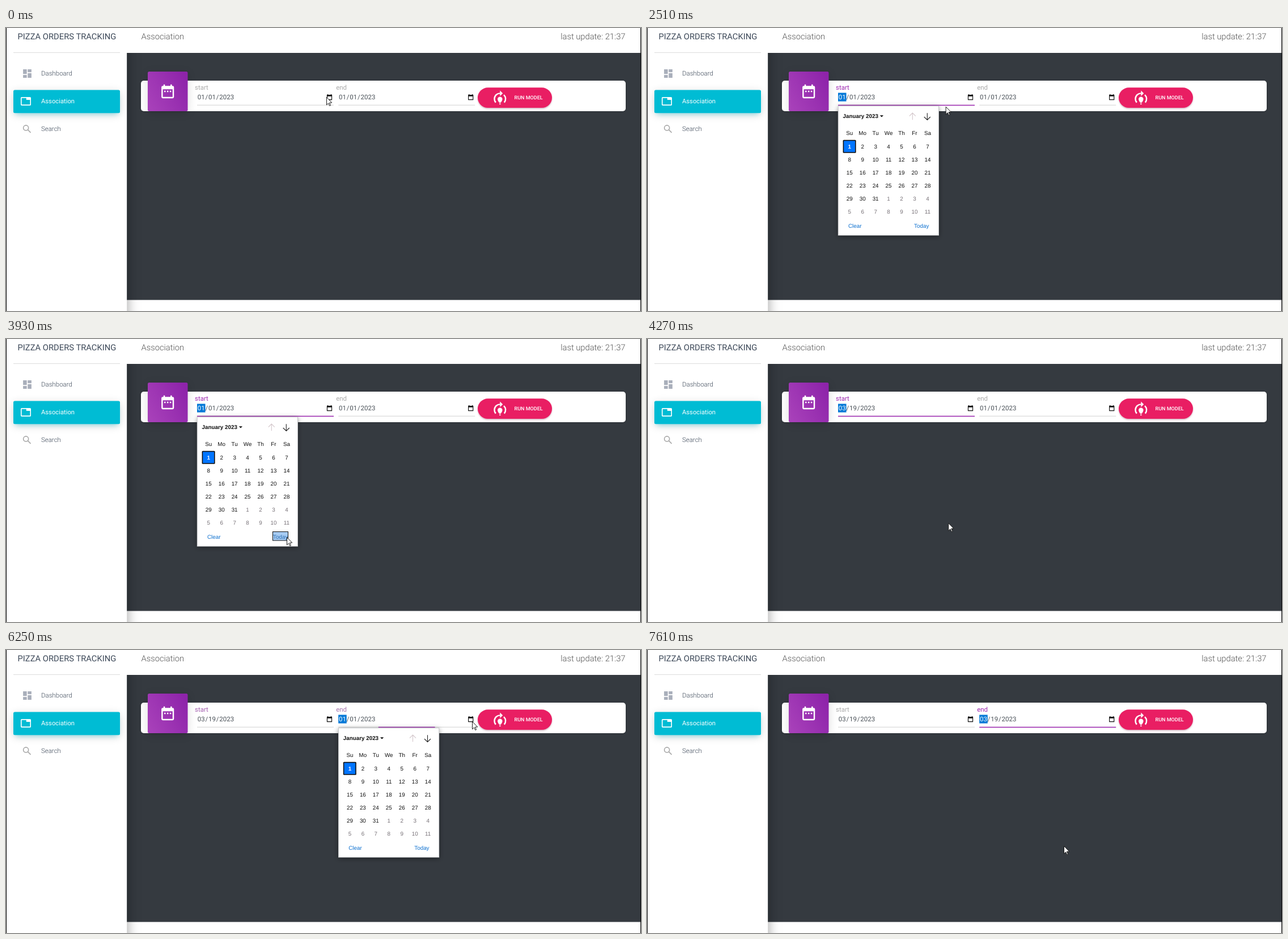
Animation of 1120 by 500 pixels, one loop 8000 ms. Source, as an HTML page with a canvas:

```html
<!DOCTYPE html>
<html lang="en">
<head>
<meta charset="utf-8">
<title>Pizza orders tracking</title>
<style>
  html, body { margin: 0; width: 100%; height: 100%; overflow: hidden; background: #fff; }
  canvas { display: block; }
</style>
</head>
<body>
<canvas id="stage" width="1120" height="500"></canvas>
<script>
const LOOP = 8000;
const SCALE = 0.82;
const STEP = 28 * SCALE;
const PURPLE = [156, 39, 176];
const GREY = [170, 170, 170];
const INK = '#101010';
const LINK = '#0b6fcf';
const SANS = '"Roboto", sans-serif';
const ARIAL = '"Liberation Sans", Arial, sans-serif';

const FIELDS = [
  { dx: 0, label: 'start', focus: 2030, blur: 6170, pick: 4130 },
  { dx: 249.2, label: 'end', focus: 6170, blur: LOOP, pick: 7460 }
];

// Pointer moves: from, until, x, y; bend delays the vertical part.
const HOME = [565, 122];
const MOVES = [
  { from: 180, until: 340, x: 569, y: 127 },
  { from: 2240, until: 2790, x: 483, y: 266, bend: 3.5 },
  { from: 2850, until: 3000, x: 501, y: 339 },
  { from: 3220, until: 3480, x: 495, y: 345 },
  { from: 3920, until: 3930, x: 495, y: 350 },
  { from: 4180, until: 4930, x: 794, y: 143 },
  { from: 4990, until: 5050, x: 808, y: 131 },
  { from: 5180, until: 5650, x: 822, y: 126, bend: 2 },
  { from: 6360, until: 6860, x: 735, y: 346 }
];

const stage = document.getElementById('stage');
const backdrop = document.createElement('canvas');
backdrop.width = stage.width;
backdrop.height = stage.height;
let ctx = backdrop.getContext('2d');

const clamp01 = v => Math.max(0, Math.min(1, v));
const easeOut = p => 1 - (1 - clamp01(p)) ** 1.7;
const lerp = (a, b, p) => a + (b - a) * p;
const mix = (a, b, p) => `rgb(${a.map((v, i) => Math.round(lerp(v, b[i], p)))})`;

function rect(x, y, w, h, fill, r = 0) {
  ctx.fillStyle = fill;
  ctx.beginPath();
  ctx.roundRect(x, y, w, h, r);
  ctx.fill();
}

function text(str, x, y, size, fill, { weight = 400, family = SANS, align = 'left' } = {}) {
  ctx.textRendering = 'geometricPrecision';
  ctx.font = `${weight} ${size * SCALE}px ${family}`;
  ctx.textAlign = align;
  ctx.fillStyle = fill;
  ctx.fillText(str, x, y);
  return ctx.measureText(str).width;
}

function polygon(points) {
  ctx.beginPath();
  for (const [x, y] of points) ctx.lineTo(x, y);
  ctx.closePath();
}

// CSS-like box shadow, painted without the box itself
function shadow(x, y, w, h, { dy = 0, blur, spread = 0, color, r = 3 }) {
  const far = 4000;
  ctx.save();
  ctx.shadowColor = color;
  ctx.shadowBlur = blur * SCALE;
  ctx.shadowOffsetX = far;
  ctx.shadowOffsetY = dy * SCALE;
  const s = spread * SCALE;
  rect(x - far - s, y - s, w + 2 * s, h + 2 * s, '#000', r);
  ctx.restore();
}

// Icons are drawn on a 24 unit grid.
function icon(cx, cy, size, color, paint) {
  ctx.save();
  ctx.translate(cx - size * SCALE / 2, cy - size * SCALE / 2);
  ctx.scale(size * SCALE / 24, size * SCALE / 24);
  ctx.fillStyle = ctx.strokeStyle = color;
  ctx.lineWidth = 2;
  ctx.beginPath();
  paint();
  ctx.restore();
}

function dashboardIcon() {
  for (const [x, split] of [[3, 13], [13, 9]]) {
    ctx.rect(x, 3, 8, split - 3);
    ctx.rect(x, split + 2, 8, 19 - split);
  }
  ctx.fill();
}

function tabIcon() {
  ctx.roundRect(1, 3, 22, 18, 2);
  ctx.rect(3, 5, 10, 14);
  ctx.rect(13, 9, 8, 10);
  ctx.fill('evenodd');
}

function searchIcon() {
  ctx.arc(9.5, 9.5, 5.5, 0, 2 * Math.PI);
  ctx.moveTo(13.7, 13.7);
  ctx.lineTo(19.7, 19.7);
  ctx.stroke();
}

function dateRangeIcon() {
  ctx.roundRect(3, 4, 18, 18, 2);
  ctx.rect(5, 9, 14, 11);
  for (const x of [7, 11, 15]) ctx.rect(x, 11, 2, 2);
  for (const x of [6, 16]) ctx.rect(x, 2, 2, 2);
  ctx.fill('evenodd');
}

function trainingIcon() {
  ctx.arc(12, 13, 8, Math.PI * 0.775, Math.PI * 1.5);
  ctx.stroke();
  ctx.beginPath();
  ctx.arc(12, 13, 8, -Math.PI * 0.26, Math.PI * 0.225);
  ctx.stroke();
  polygon([[12, 1], [16, 5], [12, 9]]);
  ctx.fill();
  ctx.beginPath();
  ctx.arc(12, 13.5, 3.5, Math.PI, 0);
  ctx.quadraticCurveTo(15.3, 15.5, 13, 18.5);
  ctx.lineTo(11, 18.5);
  ctx.quadraticCurveTo(8.7, 15.5, 8.5, 13.5);
  ctx.rect(11, 19.5, 2, 1.5);
  ctx.fill();
}

function pickerIcon() {
  ctx.rect(3, 4, 18, 18);
  ctx.rect(5.3, 9, 13.4, 10.5);
  for (const x of [5, 16.5]) ctx.rect(x, 2, 2.5, 2);
  ctx.fill('evenodd');
}

function drawSidebar() {
  ctx.save();
  ctx.beginPath();
  ctx.rect(213.2, 44, 905, 456);
  ctx.clip();
  shadow(0, -60, 213, 700, { dy: 16, blur: 38, spread: -12, color: 'rgba(0,0,0,.56)' });
  shadow(0, -60, 213, 700, { dy: 4, blur: 25, color: 'rgba(0,0,0,.12)' });
  ctx.restore();

  text('PIZZA ORDERS TRACKING', 20.5, 20.3, 18, '#3c4858');
  rect(13, 43, 188, 1, '#dcdcdc');

  const tab = [13, 109.4, 188, 40.8];
  shadow(...tab, { dy: 4, blur: 20, color: 'rgba(0,0,0,.14)' });
  shadow(...tab, { dy: 7, blur: 10, spread: -5, color: 'rgba(0,188,212,.4)' });
  rect(...tab, '#00bcd4', 2.5);

  icon(37.5, 80.5, 24, '#a9afbb', dashboardIcon);
  icon(35, 129.5, 24, '#fff', tabIcon);
  icon(37.2, 178.5, 24, '#a9a9a9', searchIcon);
  ['Dashboard', 'Association', 'Search'].forEach((name, i) => {
    const active = i === 1;
    text(name, 62, 84 + 49 * i, active ? 13.7 : 14, active ? '#fff' : '#3c4858', { weight: active ? 400 : 300 });
  });
}

function drawCard() {
  shadow(238, 93, 855, 54, { dy: 1, blur: 4, color: 'rgba(0,0,0,.14)', r: 5 });
  rect(238, 93, 855, 54, '#fff', 5);

  shadow(250, 77, 70.5, 70, { dy: 4, blur: 20, color: 'rgba(0,0,0,.14)' });
  const violet = ctx.createLinearGradient(250, 130, 320, 94);
  violet.addColorStop(0, '#a740b9');
  violet.addColorStop(1, '#8e24aa');
  rect(250, 77, 70.5, 70, violet, 2.5);
  icon(285.2, 112, 36, '#fff', dateRangeIcon);

  const button = [832, 105.3, 131, 35.8];
  shadow(...button, { dy: 2, blur: 3, color: 'rgba(120,20,60,.3)', r: 18 });
  rect(...button, '#e91e63', 18);
  icon(871.3, 124, 36, '#fff', trainingIcon);
  text('RUN MODEL', 896.5, 126, 11, '#fff', { weight: 500 });
}

function drawBackdrop() {
  rect(0, 0, 1120, 500, '#fff');
  rect(213.2, 44, 905.8, 436.5, '#353a40');
  drawSidebar();
  drawCard();
  text('Association', 238.5, 20.3, 18, '#555', { weight: 300 });
  text('last update: 21:37', 1092.5, 20.3, 18, '#555', { weight: 300, align: 'right' });
  rect(0, 0, 1, 500, '#000');
  rect(1119, 0, 1, 500, '#000');
}

function drawDate(x, date, selected) {
  const pad = SCALE;
  date.split('/').forEach((part, i) => {
    if (i) x += text('/', x, 126, 14, '#495057');
    const active = selected && i === 0;
    const width = 14 * SCALE * 0.5616 * part.length;
    if (active) rect(x, 114.5, width + 2 * pad, 15.1, '#0078d7');
    text(part, x + pad, 126, 14, active ? '#fff' : '#495057');
    x += width + 2 * pad;
  });
}

function drawField(f, t) {
  const x = 337 + f.dx, width = 241;
  const focused = t >= f.focus && t < f.blur;
  const grown = focused ? easeOut((t - f.focus) / 300) : 0;
  const tint = t < f.blur ? grown : 1 - easeOut((t - f.blur) / 300);

  text(f.label, 333 + f.dx, 109, 14, mix(GREY, PURPLE, tint));
  rect(x, 135.7, width, 1, '#d2d2d2');
  rect(x + width / 2 * (1 - grown), 135.7, width * grown, 1.6, '#9c27b0');
  drawDate(x, t >= f.pick ? '03/19/2023' : '01/01/2023', focused);
  icon(570.5 + f.dx, 122.2, 15, '#111', pickerIcon);
}

function drawArrow(x, y, dir, color) {
  ctx.strokeStyle = color;
  ctx.lineWidth = 1.1;
  ctx.beginPath();
  ctx.moveTo(x, y - 6 * dir);
  ctx.lineTo(x, y + 6 * dir);
  ctx.moveTo(x - 5.5, y + 0.7 * dir);
  ctx.lineTo(x, y + 6.2 * dir);
  ctx.lineTo(x + 5.5, y + 0.7 * dir);
  ctx.stroke();
}

function drawMonth(x) {
  const bold = { family: ARIAL, weight: 700 };
  const centered = { family: ARIAL, align: 'center' };
  const column = i => x + 20.4 + (i % 7) * STEP;

  text('January 2023', x + 8.8, 159.2, 12, INK, bold);
  polygon([[x + 74, 154.3], [x + 80.2, 154.3], [x + 77.1, 157.5]]);
  ctx.fill();
  drawArrow(x + 131.5, 156.3, -1, '#d3c6ca');
  drawArrow(x + 157.5, 156.3, 1, '#222');

  'Su Mo Tu We Th Fr Sa'.split(' ').forEach((day, i) =>
    text(day, column(i), 189.2, 12, INK, centered));

  rect(x + 8.8, 197.8, 23, 23, INK, 1.5);
  rect(x + 10.4, 199.4, 19.8, 19.8, '#0075ff');
  for (let i = 0; i < 42; i++) {
    const color = i === 0 ? '#fff' : i < 31 ? INK : '#767076';
    const y = 212.9 + Math.floor(i / 7) * STEP;
    text(i % 31 + 1, column(i), y, 12, color, i ? centered : { ...centered, ...bold });
  }
}

function drawPopup(f, t, [px, py]) {
  const fade = 70;
  if (t < f.focus || t >= f.pick + fade) return;
  const x = 336.8 + f.dx, y = 137.5, w = 178.2, h = 229.2;

  ctx.save();
  ctx.beginPath();
  ctx.rect(0, 0, 1120, 500);
  ctx.rect(x, y, w, h);
  ctx.clip('evenodd');
  shadow(x, y, w, h, { dy: 2, blur: 11, color: 'rgba(0,0,0,.42)' });
  ctx.restore();

  if (t < f.focus + fade) {
    const shade = ctx.createLinearGradient(0, y, 0, 147);
    shade.addColorStop(0, 'rgba(0,0,0,.16)');
    shade.addColorStop(1, 'rgba(0,0,0,.03)');
    rect(x, y, w, 9.5, shade);
    return;
  }
  rect(x, y, w, h, '#b4b6b9');
  rect(x + 0.8, y + 0.8, w - 1.6, h - 1.6, '#fff');
  drawMonth(x);

  const hover = px > x + 133 && px < x + 161 && py >= 340 && py < 357;
  if (hover) {
    rect(x + 133.2, 340, 28, 16.5, INK);
    rect(x + 134.2, 341, 26, 14.5, '#a6cbf3');
  }
  text('Clear', x + 18.2, 352.8, 12, LINK, { family: ARIAL });
  text('Today', x + 134.3, 352.8, 12, hover ? '#2a6cae' : LINK, { family: ARIAL });
}

function pointerAt(t) {
  let [x, y] = HOME;
  for (const m of MOVES) {
    const p = clamp01((t - m.from) / (m.until - m.from));
    x = lerp(x, m.x, p);
    y = lerp(y, m.y, p ** (m.bend || 1));
  }
  return [x, y];
}

function drawPointer([x, y]) {
  const outline = [[0, 0], [0, 17], [4, 13.2], [6.8, 19], [9.2, 18], [6.5, 12.2], [12, 12]];
  polygon(outline.map(([dx, dy]) => [x + 0.5 + dx * 0.77, y + 0.5 + dy * 0.79]));
  ctx.fillStyle = '#fff';
  ctx.strokeStyle = '#111';
  ctx.lineWidth = 0.95;
  ctx.fill();
  ctx.stroke();
}

function render(t) {
  const pointer = pointerAt(t);
  ctx.drawImage(backdrop, 0, 0);
  for (const f of FIELDS) drawField(f, t);
  for (const f of FIELDS) drawPopup(f, t, pointer);
  drawPointer(pointer);
}

drawBackdrop();
ctx = stage.getContext('2d');
const begin = performance.now();

function tick() {
  render((performance.now() - begin) % LOOP);
  requestAnimationFrame(tick);
}
tick();
</script>
</body>
</html>
```
